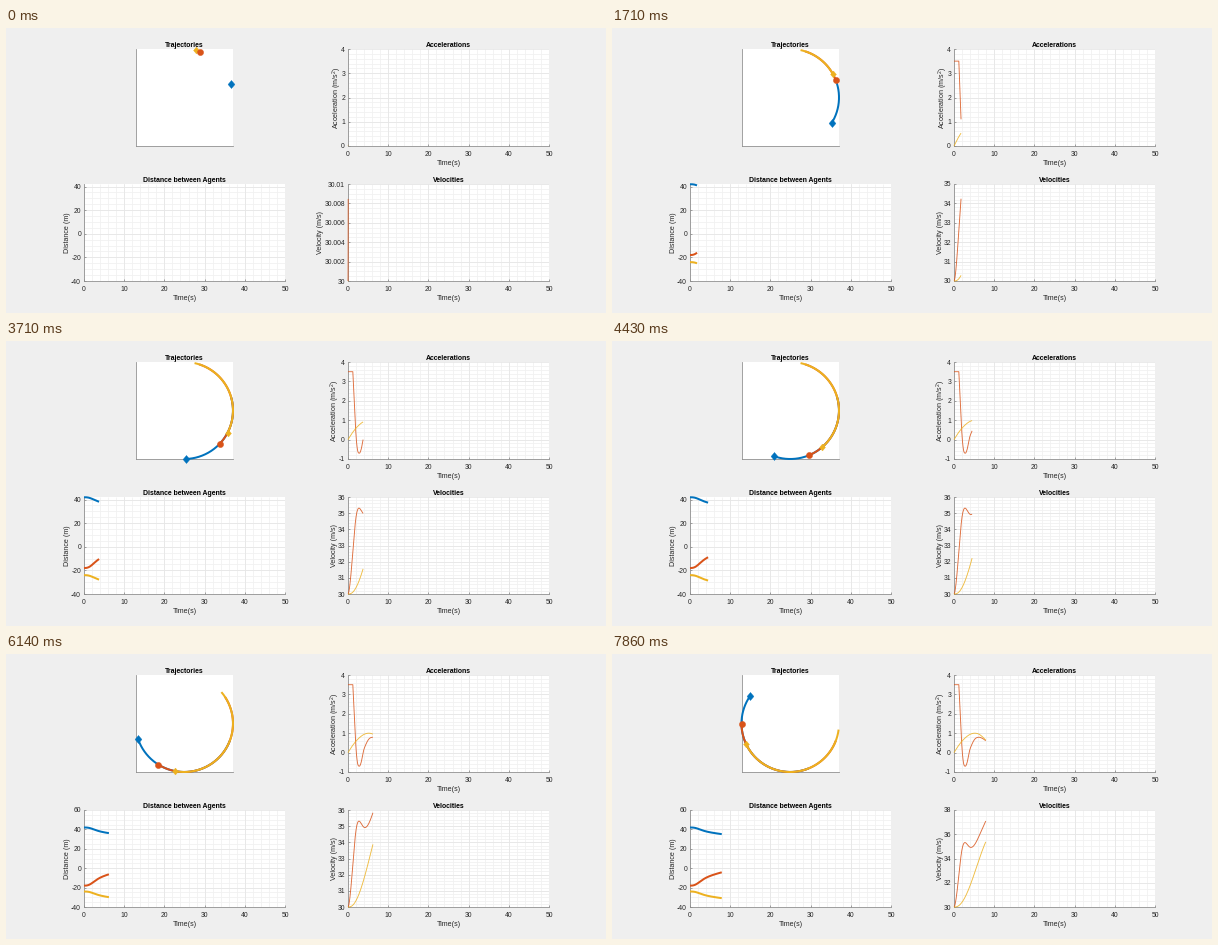
A matplotlib script for the animation above (8 s loop, 600 px wide and 285 px high).

```python
import math

import numpy as np
import matplotlib.pyplot as plt
from matplotlib.animation import FuncAnimation
from matplotlib.collections import LineCollection

W, H, DPI = 600, 285, 100
LOOP, TICK = 8000, 50   # ms
PICTURES_PER_S = 7      # the plots refresh seven times a second
BLUE, RED, GOLD = "#0072BD", "#D95319", "#EDB120"
INK, EDGE = "#262626", "#8c8c8c"
PT = 72 / DPI           # points per pixel
TICK_PX, LABEL_PX, TITLE_PX = 6.8, 7.1, 6.9
DIAMOND = [(0, 1), (0.85, 0), (0, -1), (-0.85, 0), (0, 1)]

plt.rcParams.update({
    "font.family": "Liberation Sans",
    "mathtext.default": "regular",
    "axes.unicode_minus": False,
})


# ---------- simulation ----------

def hermite(t, xs, ys):
    """Smooth curve through a few points."""
    xs, ys = np.array(xs), np.array(ys)
    slope = np.gradient(ys, xs)
    i = np.clip(np.searchsorted(xs, t, side="right") - 1, 0, len(xs) - 2)
    h = xs[i + 1] - xs[i]
    s = (t - xs[i]) / h
    return ((1 + 2 * s) * (1 - s) ** 2 * ys[i] + s * (1 - s) ** 2 * h * slope[i]
            + s * s * (3 - 2 * s) * ys[i + 1] + s * s * (s - 1) * h * slope[i + 1])


def integrate(rate, start=0.0):
    steps = (rate[1:] + rate[:-1]) * DT / 2
    return start + np.concatenate(([0.0], np.cumsum(steps)))


def lagged(u, tau=0.5):
    """First-order response of the vehicle to its commanded acceleration."""
    a = np.zeros_like(u)
    k = 1 - math.exp(-DT / tau)
    for n in range(1, len(u)):
        a[n] = a[n - 1] + k * (u[n - 1] - a[n - 1])
    return a


DT = 0.01
t = np.arange(0, 8.06, DT)

u_red = hermite(t, [1.2, 1.75, 2.05, 2.3, 2.8, 3.3, 3.75, 4.5, 5.2, 6.0, 7.0, 8.1],
                [3.5, 1.1, 0.05, -0.45, -0.7, -0.48, 0.0, 0.45, 0.7, 0.79, 0.74, 0.58])
u_red = np.where(t < 1.2, 3.5, u_red)
u_gold = hermite(t, [0, 0.75, 1.75, 2.9, 4.0, 5.3, 6.2, 7.0, 8.1],
                 [0, 0.25, 0.53, 0.78, 0.94, 1.0, 0.95, 0.83, 0.6])

v_red = integrate(lagged(u_red), 30)
v_gold = integrate(lagged(u_gold), 30)
gain = integrate(v_red - v_gold)

dist = {BLUE: 42 - gain / 3, RED: -18 + 2 * gain / 3, GOLD: -24 - gain / 3}

RADIUS = 62.5
gold_angle = math.radians(12.2) + integrate(v_gold) / RADIUS
angle = {
    BLUE: gold_angle + math.radians(60.6),
    RED: gold_angle + math.radians(5.6) + gain / RADIUS,
    GOLD: gold_angle,
}
TRAIL = int(4.85 / DT)


# ---------- layout ----------

fig = plt.figure(figsize=(W / DPI, H / DPI), dpi=DPI, facecolor="#efefef")


def label(x, y, text, px, **kw):
    return fig.text(x / W, 1 - y / H, text, fontsize=px * PT,
                    ha="center", va="baseline", **kw)


def panel(x, y, w, h, title):
    ax = fig.add_axes([x / W, 1 - (y + h) / H, w / W, h / H], facecolor="white")
    for side in ("top", "right"):
        ax.spines[side].set_visible(False)
    for side in ("left", "bottom"):
        ax.spines[side].set(color=EDGE, linewidth=0.8 * PT)
    label(x + w / 2, y - 2.2, title, TITLE_PX, weight="bold", color="black")
    return ax


def text_width(s):
    em = {".": 0.278, "-": 0.333}
    return sum(em.get(c, 0.556) for c in s) * TICK_PX


class Chart:
    """A time plot whose vertical scale can change while it runs."""

    def __init__(self, x, y, title, unit, series, width, alpha=1):
        self.x = x
        self.ax = ax = panel(x, y, 201, 97, title)
        ax.set_axisbelow(True)
        ax.tick_params(direction="in", length=2 * PT, width=0.8 * PT, color=EDGE,
                       labelcolor=INK, labelsize=TICK_PX * PT)
        ax.tick_params(axis="x", pad=4.8 * PT)
        ax.tick_params(axis="y", pad=3 * PT)
        ax.set_xticks(range(0, 51, 10))
        ax.set_xlim(0, 50)
        ax.grid(color="#e6e6e6", linewidth=0.8 * PT)
        self.minor = LineCollection([], colors="#f1f1f1", linewidths=0.8 * PT, zorder=0.3)
        ax.add_collection(self.minor, autolim=False)
        label(x + 100.5, y + 116.1, "Time(s)", LABEL_PX, color=INK)
        self.unit = label(x, y + 49, unit, LABEL_PX, color=INK,
                          rotation=90, rotation_mode="anchor")
        self.series = series
        self.lines = {c: ax.plot([], [], color=c, linewidth=width * PT, alpha=alpha,
                                 clip_on=False, zorder=3, solid_capstyle="butt")[0]
                      for c in series}

    def scale(self, low, high, step):
        ticks = low + step * np.arange(int((high - low) / step + 1e-6) + 1)
        names = [f"{round(v, 6):g}" for v in ticks]
        lead = round(step / 10 ** math.floor(math.log10(step) + 1e-9))
        part = step / (4 if lead == 2 else 5)
        rows = np.arange(low, high, part)
        self.minor.set_segments([[(0, v), (50, v)] for v in rows]
                                + [[(s, low), (s, high)] for s in range(0, 51, 2)])
        self.ax.set_yticks(ticks, names)
        self.ax.set_ylim(low, high)
        edge = self.x - 3 - max(map(text_width, names))
        self.unit.set_x((edge - 1.8) / W)

    def show(self, n):
        for c, line in self.lines.items():
            line.set_data(t[:n + 1], self.series[c][:n + 1])


def nice_step(span, most=6):
    """Smallest 1-2-5 step that covers the span in few intervals."""
    base = 10 ** math.floor(math.log10(span) - 1)
    for m in (1, 2, 5, 10, 20, 50):
        if math.ceil(span / (m * base) - 1e-9) <= most:
            return m * base
    return 100 * base


track = panel(129.5, 21, 97.5, 97, "Trajectories")
track.set(xlim=(-RADIUS, RADIUS), ylim=(-RADIUS, RADIUS), xticks=[], yticks=[])
trails, heads = {}, {}
for z, (c, shape, size) in enumerate([(BLUE, DIAMOND, 8), (RED, "o", 6.2), (GOLD, DIAMOND, 6.8)]):
    trails[c], = track.plot([], [], color=c, linewidth=2 * PT, clip_on=False,
                            solid_capstyle="butt", zorder=3 + z)
    heads[c], = track.plot([], [], marker=shape, color=c, markersize=size * PT,
                           clip_on=False, markeredgewidth=0.4 * PT,
                           zorder=8 if c == RED else 7)

accel = Chart(342, 21, "Accelerations", "Acceleration (m/s$^2$)",
              {RED: u_red, GOLD: u_gold}, 0.9, 0.85)
gaps = Chart(78, 156, "Distance between Agents", "Distance (m)", dist, 2)
speed = Chart(342, 156, "Velocities", "Velocity (m/s)",
              {RED: v_red, GOLD: v_gold}, 0.9, 0.85)


def draw(k):
    # A picture due within this tick is shown from the tick's start.
    shot = int((k + 0.9) * TICK * PICTURES_PER_S / 1000)
    n = 5 * (round(20 * shot / PICTURES_PER_S) + 1)

    for c, a in angle.items():
        part = a[max(0, n - TRAIL):n + 1]
        xs, ys = RADIUS * np.sin(part), RADIUS * np.cos(part)
        trails[c].set_data(xs, ys)
        heads[c].set_data(xs[-1:], ys[-1:])

    accel.scale(-1 if u_red[:n + 1].min() < 0 else 0, 4, 1)
    gaps.scale(-40, 60 if dist[GOLD][n] < -29.5 else 42.2, 20)
    span = v_red[:n + 1].max() - 30
    step = nice_step(span)
    speed.scale(30, 30 + step * math.ceil(span / step - 1e-9), step)

    for chart in (accel, gaps, speed):
        chart.show(n)
    return []


anim = FuncAnimation(fig, draw, frames=LOOP // TICK, interval=TICK,
                     init_func=lambda: draw(0), repeat=True, repeat_delay=0,
                     blit=False)
plt.show()
```
